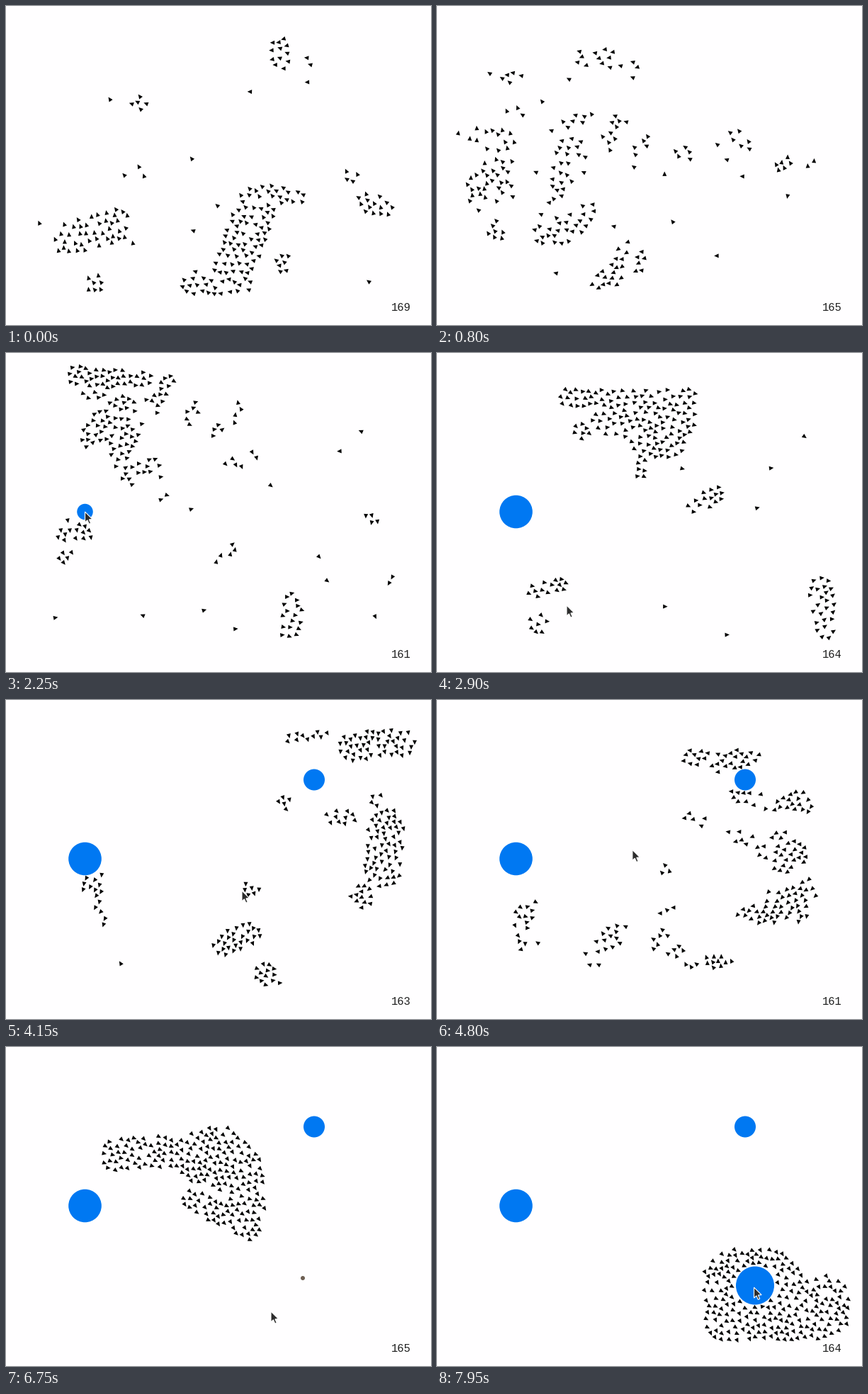
Animation of 600 by 450 pixels, one loop 8 s. Source, as a matplotlib script:

```python
import numpy as np
import matplotlib.pyplot as plt
from matplotlib.animation import FuncAnimation
from matplotlib.collections import PolyCollection
from matplotlib.patches import Circle, Polygon

W, H, DPI = 600, 450, 100
FRAMES, STEP = 160, 50
N = 208
rng = np.random.default_rng(12)

# Where the flock gathers: x, y, radius and, for long groups, a stretch dx, dy
SPREAD = [(385, 55, 12, 2, 24), (427, 78, 7), (188, 138, 11), (192, 233, 8),
          (88, 327, 23, 65, -18), (125, 390, 13), (262, 390, 16, 70, 0),
          (322, 372, 28, 30, -88), (370, 263, 12, 38, 6), (392, 362, 12),
          (486, 237, 11), (508, 275, 14, 24, 10)]
LEFT = [(45, 55, 17, 38, -4), (60, 95, 10, 38, 3), (105, 46, 7, 40, -4),
        (172, 55, 10, -20, 32), (74, 143, 22, -14, 46), (64, 236, 17, 58, -8),
        (230, 111, 12), (309, 148, 14), (361, 123, 12), (502, 162, 10),
        (268, 360, 17, -22, 28)]
TOP = [(185, 63, 12, 170, 0), (245, 92, 26, 95, 0), (295, 125, 20, 35, 5),
       (290, 150, 6, -2, 22), (205, 110, 12), (366, 217, 12, 28, -18),
       (138, 337, 9, 36, -10), (145, 381, 14), (541, 332, 16, 10, 55)]
RIGHT = [(490, 66, 19, 68, -6), (400, 54, 5, 50, -6), (460, 166, 9, 30, 0),
         (537, 180, 25, -6, 60), (503, 277, 16), (524, 142, 10), (394, 145, 9),
         (347, 265, 12), (308, 344, 16, 34, -15), (367, 387, 15),
         (122, 258, 18), (130, 290, 6, 7, 22)]
MIDDLE = [(242, 88, 17, 46, -3), (254, 162, 13), (294, 162, 11, 24, 18),
          (319, 198, 3, 34, 7), (392, 221, 34), (130, 268, 13, 34, -22),
          (124, 302, 14), (266, 260, 15), (297, 302, 12), (345, 306, 15, 18, -2),
          (412, 312, 27, 22, -3), (469, 342, 8)]
BAND = [(156, 153, 22, 72, -6), (276, 155, 37, 28, -6), (315, 168, 38, 14, 8),
        (264, 217, 15, 80, 40), (340, 225, 26)]
CORNER = [(425, 338, 52, 40, 0), (408, 386, 29, 130, -2), (546, 358, 36, 3, 18)]
STAGES = [SPREAD, LEFT, TOP, RIGHT, MIDDLE, BAND, CORNER]
KEYS = np.array([0, 32, 58, 83, 110, 135, 159])
COUNTS = [169, 162, 164, 163, 164, 165, 164]

# x, y, full radius, time the press begins
DISCS = [(111.5, 224, 23.3, 2000), (435, 112.5, 15, 3450), (449, 336.5, 27, 7350)]
GROWTH = 0.045
FOOD = (419, 326)
FOOD_TIME = 6400, 7200

# time, x, y of the pointer's tip; it also rests on each disc while pressing
WAYPOINTS = [(1000, 262, 330), (1600, 183, 223), (2900, 183, 356), (4150, 333, 269),
             (5500, 212, 147), (FOOD_TIME[0], *FOOD), (6750, 374, 373), (8000, 447, 340)]
PRESSES = [(t + dt, x, y) for x, y, r, t in DISCS for dt in (0, r / GROWTH - 100)]
POINTER = np.array(sorted(WAYPOINTS + PRESSES))


def radius(disc, t):
    return float(np.clip((t - disc[3]) * GROWTH, 0, disc[2]))


def norm(v):
    return np.hypot(v[..., 0], v[..., 1])[..., None] + 1e-6


def inside(p, group):
    """True for points within the group's radius of its axis."""
    x, y, r, dx, dy = (*group, 0, 0)[:5]
    d, axis = p - (x, y), np.array([dx, dy])
    s = np.clip(d @ axis / (axis @ axis + 1e-6), 0, 1)
    return norm(d - s[:, None] * axis)[:, 0] < r


def scatter(groups, t, strays):
    """Lone birds anywhere, the rest spaced out over the groups."""
    pool = rng.uniform((0, 0), (W, H), (14000, 2))
    keep = np.any([inside(pool, g) for g in groups], axis=0)
    for disc in DISCS:
        keep &= ~inside(pool, (*disc[:2], radius(disc, t) + 4))
    lone = rng.uniform((40, 70), (560, 400), (strays, 2))
    pool = np.vstack([lone, pool[keep]])
    picks = list(range(max(strays, 1)))
    gap = norm(pool[:, None] - pool[picks])[..., 0].min(1)
    while len(picks) < N:
        k = int(gap.argmax())
        picks.append(k)
        gap = np.minimum(gap, norm(pool - pool[k])[:, 0])
    return pool[picks]


def match(a, b):
    """Reorder b so that the total travel from a is short."""
    cost = ((a[:, None] - b[None]) ** 2).sum(2)
    order = np.arange(N)
    for _ in range(60):
        swapped = False
        for i in range(N):
            now = cost[np.arange(N), order]
            gain = now[i] + now - cost[i, order] - cost[:, order[i]]
            j = int(gain.argmax())
            if gain[j] > 1e-6:
                order[i], order[j] = order[j], order[i]
                swapped = True
        if not swapped:
            break
    return b[order]


def velocities(points):
    """Velocity at each key, aligned with close neighbours."""
    out = []
    for k, p in enumerate(points):
        a, b = max(k - 1, 0), min(k + 1, len(points) - 1)
        v = (points[b] - points[a]) / (KEYS[b] - KEYS[a])
        d2 = ((p[:, None] - p[None]) ** 2).sum(2)
        w = np.exp(-d2 / (2 * 35 ** 2))
        v = w @ v / w.sum(1, keepdims=True)
        speed = norm(v)
        out.append(v / speed * np.clip(speed, 6, 11))
    return out


def separate(p, gap=8.5):
    for _ in range(4):
        d = p[:, None] - p[None]
        dist = norm(d)
        p = p + (d / dist * np.clip(gap - dist, 0, None) * 0.3).sum(1)
    return p


def avoid_discs(p, t):
    for disc in DISCS:
        r = radius(disc, t)
        if r > 0:
            d = p - disc[:2]
            p = disc[:2] + d / norm(d) * np.maximum(norm(d), r + 4)
    return p


def bounce(p, lo=np.array([21, 19]), hi=np.array([582, 430])):
    return hi - np.abs(hi - lo - np.abs(p - lo))


def segment(i):
    """Index of the current pair of keys, its length and the progress in it."""
    k = min(np.searchsorted(KEYS, i, side="right") - 1, len(KEYS) - 2)
    span = KEYS[k + 1] - KEYS[k]
    return k, span, (i - KEYS[k]) / span


def build_tracks():
    points = []
    for k, groups in enumerate(STAGES):
        p = scatter(groups, KEYS[k] * STEP, max(0, 12 - 3 * k))
        points.append(match(points[-1], p) if points else p)
    vel = velocities(points)
    track = np.empty((FRAMES, N, 2))
    for i in range(FRAMES):
        k, span, s = segment(i)
        ease = s * s * (3 - 2 * s)
        p = (points[k] + ease * (points[k + 1] - points[k])
             + span * s * (1 - s) * ((1 - s) * vel[k] - s * vel[k + 1]))
        track[i] = bounce(avoid_discs(separate(p), i * STEP))
    return track


track = build_tracks()
motion = np.gradient(track, axis=0)
sway = 0.35 * np.sin(np.arange(FRAMES)[:, None] * 0.3 + rng.uniform(0, 2 * np.pi, N))
angle = np.arctan2(motion[..., 1], motion[..., 0]) + sway
jitter = rng.uniform(-2.5, 2.5, FRAMES // 4 + 1)

BOID = np.array([(3.8, 0), (-2.6, 3), (-2.6, -3)])
ARROW = np.array([(0, 0), (0, 15), (3.4, 11.8), (5.8, 17.2), (8.2, 16.1),
                  (5.9, 10.9), (10.6, 10.6)])

fig = plt.figure(figsize=(W / DPI, H / DPI), dpi=DPI, facecolor="#fffeff")
ax = fig.add_axes([0, 0, 1, 1])
ax.set_xlim(0, W)
ax.set_ylim(H, 0)
ax.axis("off")

boids = PolyCollection([], facecolors="black", edgecolors="none", zorder=2)
ax.add_collection(boids)
discs = [ax.add_patch(Circle(d[:2], 0, fc="#0078f2", ec="none", zorder=3)) for d in DISCS]
food = ax.add_patch(Circle(FOOD, 3, fc="#6e6054", ec="none", zorder=1))
pointer = ax.add_patch(Polygon(ARROW, fc="#2c2c2c", ec="white", lw=0.8, zorder=5))
counter = ax.text(571.5, 429.5, "", ha="right", va="baseline", color="#222222",
                  family="Liberation Mono", size=15.5 * 72 / DPI, zorder=6)


def pointer_at(t):
    k = int(np.clip(np.searchsorted(POINTER[:, 0], t, side="right") - 1, 0, len(POINTER) - 2))
    a, b = POINTER[k], POINTER[k + 1]
    s = np.clip((t - a[0]) / (b[0] - a[0]), 0, 1)
    return a[1:] + (b[1:] - a[1:]) * s * s * (3 - 2 * s)


def reading(i):
    s = segment(i)[2]
    return round(np.interp(i, KEYS, COUNTS) + jitter[i // 4] * np.sin(np.pi * s))


def draw(i):
    t = i * STEP
    c, s = np.cos(angle[i])[:, None], np.sin(angle[i])[:, None]
    x, y = BOID.T
    boids.set_verts(track[i][:, None] + np.stack([c * x - s * y, s * x + c * y], axis=2))
    for patch, disc in zip(discs, DISCS):
        patch.set_radius(radius(disc, t))
        patch.set_visible(t > disc[3])
    food.set_visible(FOOD_TIME[0] <= t < FOOD_TIME[1])
    pointer.set_xy(ARROW + pointer_at(t))
    pointer.set_visible(t >= POINTER[0, 0])
    counter.set_text(str(reading(i)))
    return [boids, *discs, food, pointer, counter]


anim = FuncAnimation(fig, draw, frames=FRAMES, interval=STEP, repeat=True, repeat_delay=0)
plt.show()
```
